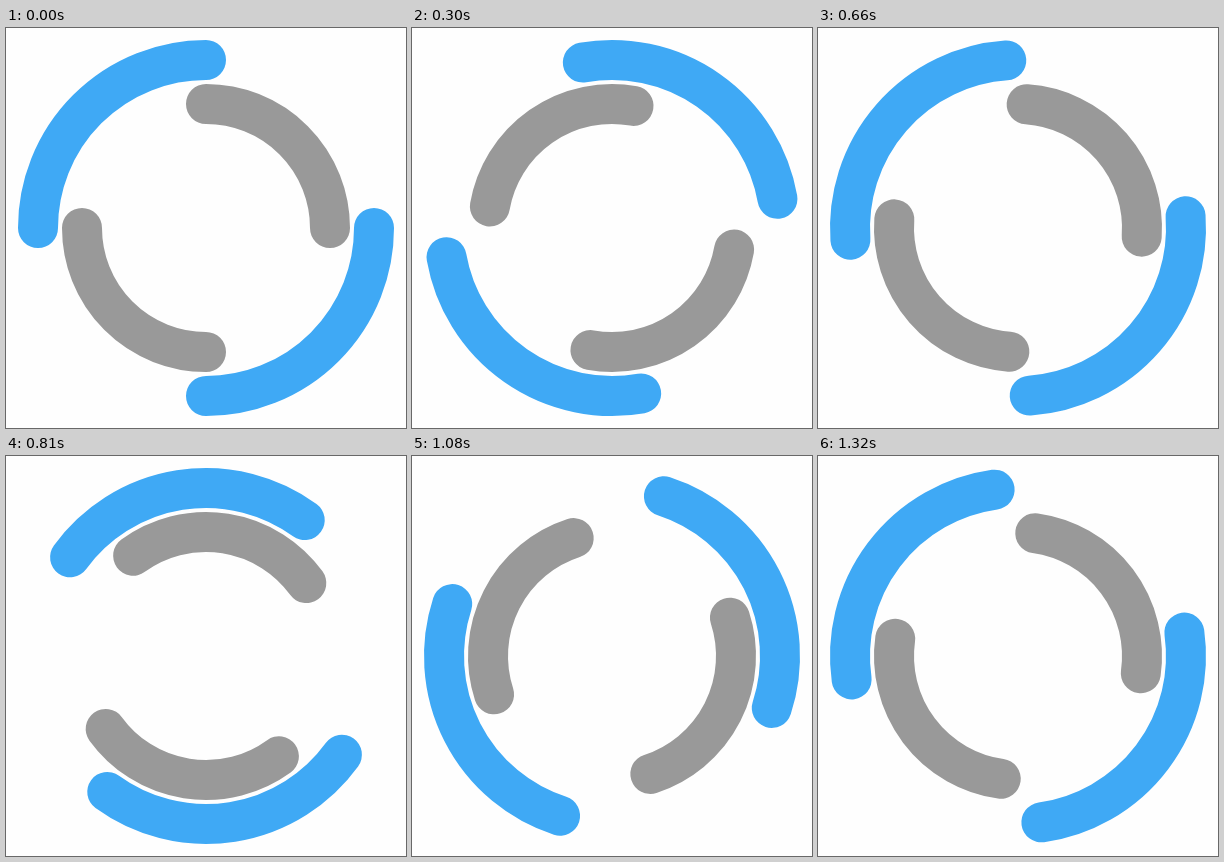
These frames come from a looping animation (400x400 px, 1.35 s). An HTML page with a canvas:

```html
<!DOCTYPE html>
<html lang="en">
<head>
<meta charset="utf-8">
<title>Double ring spinner</title>
<style>
  html, body { margin: 0; width: 100%; height: 100%; overflow: hidden; background: #fefefe; }
  canvas { display: block; width: 400px; height: 400px; }
</style>
</head>
<body>
<canvas id="stage" width="400" height="400"></canvas>
<script>
  const ctx = document.getElementById('stage').getContext('2d');
  const LOOP = 1350;
  const STEP = 30;
  const QUARTER = Math.PI / 2;

  // Two opposite quarter arcs, the first beginning at `start`.
  function drawRing(radius, color, start) {
    ctx.strokeStyle = color;
    for (const from of [start, start + Math.PI]) {
      ctx.beginPath();
      ctx.arc(200, 200, radius, from, from + QUARTER);
      ctx.stroke();
    }
  }

  function draw(time) {
    const stepped = Math.floor((time % LOOP) / STEP) * STEP;
    const turn = stepped / LOOP * 2 * Math.PI;
    ctx.fillStyle = '#fefefe';
    ctx.fillRect(0, 0, 400, 400);
    ctx.lineWidth = 40;
    ctx.lineCap = 'round';
    drawRing(168, '#3fa9f5', turn);
    drawRing(124, '#999999', -QUARTER - turn);
  }

  let origin;
  function tick(now) {
    origin ??= now;
    draw(Math.max(0, now - origin));
    requestAnimationFrame(tick);
  }

  draw(0);
  requestAnimationFrame(tick);
</script>
</body>
</html>
```
